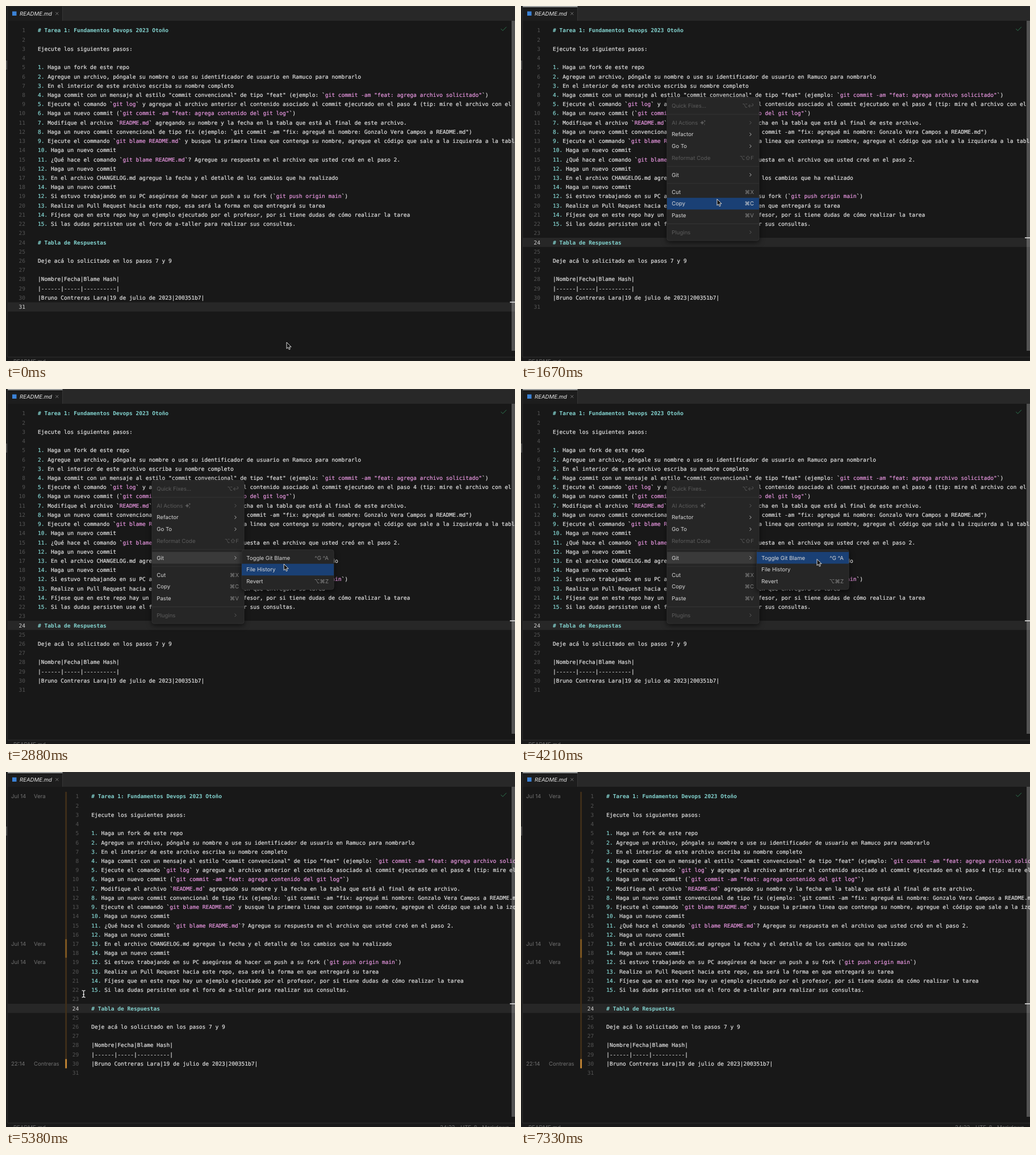
Animation of 896 by 625 pixels, one loop 7.43 s. Source, as an HTML page:

```html
<!DOCTYPE html>
<html lang="es">
<head>
<meta charset="utf-8">
<title>README.md</title>
<style>
  html, body { margin: 0; width: 100%; height: 100%; overflow: hidden; background: #181818; }
  svg { display: block; width: 896px; height: 625px; }
  text { white-space: pre; text-rendering: geometricPrecision; color: #d8d8d8; fill: currentColor; font: 9.6px Inter, "DejaVu Sans", sans-serif; }
  .mono { color: #dedede; font: 9.56px "DejaVu Sans Mono", monospace; stroke: currentColor; stroke-width: .22px; }
  .head { color: #82d2ce; font-weight: bold; stroke: none; }
  .num { color: #82d2ce; fill: currentColor; stroke: currentColor; }
  .code { color: #e394dc; fill: currentColor; stroke: currentColor; }
  .title { color: #e6e6e6; font-style: italic; }
  .line-no { color: #545454; text-anchor: end; stroke: none; }
  .line-no.on { color: #d6d6d6; }
  .note { color: #707070; }
  .off { color: #5c5c5c; }
  .key { color: #858585; text-anchor: end; }
  .key.off { color: #5c5c5c; }
  .key.lit { color: #d6d6d6; }
  .panel { fill: #262626; stroke: #303030; filter: drop-shadow(0 3px 5px #0009); }
  .stroke { fill: none; stroke-width: 1; }
</style>
</head>
<body>
<svg id="stage" viewBox="0 0 896 625"></svg>
<script>
const LOOP = 7430, ROW = 16.224, TOP = 34.9, SHIFT = 94.2;
const FOCUS_AT = 700, MENU_AT = 830, SUBMENU_AT = 2380, BLAME_AT = 4330;
const BLINK_FROM = 4920, BLINK = 602.5;

const source = `# Tarea 1: Fundamentos Devops 2023 Otoño

Ejecute los siguientes pasos:

1. Haga un fork de este repo
2. Agregue un archivo, póngale su nombre o use su identificador de usuario en Ramuco para nombrarlo
3. En el interior de este archivo escriba su nombre completo
4. Haga commit con un mensaje al estilo "commit convencional" de tipo "feat" (ejemplo: 'git commit -am "feat: agrega archivo solicitado"')
5. Ejecute el comando 'git log' y agregue al archivo anterior el contenido asociado al commit ejecutado en el paso 4 (tip: mire el archivo con el
6. Haga un nuevo commit ('git commit -am "feat: agrega contenido del git log"')
7. Modifique el archivo 'README.md' agregando su nombre y la fecha en la tabla que está al final de este archivo.
8. Haga un nuevo commit convencional de tipo fix (ejemplo: 'git commit -am "fix: agregué mi nombre: Gonzalo Vera Campos a README.md")
9. Ejecute el commando 'git blame README.md' y busque la primera linea que contenga su nombre, agregue el código que sale a la izquierda a la tabla
10. Haga un nuevo commit
11. ¿Qué hace el comando 'git blame README.md'? Agregue su respuesta en el archivo que usted creó en el paso 2.
12. Haga un nuevo commit
13. En el archivo CHANGELOG.md agregue la fecha y el detalle de los cambios que ha realizado
14. Haga un nuevo commit
12. Si estuvo trabajando en su PC asegúrese de hacer un push a su fork ('git push origin main')
13. Realize un Pull Request hacia este repo, esa será la forma en que entregará su tarea
14. Fíjese que en este repo hay un ejemplo ejecutado por el profesor, por si tiene dudas de cómo realizar la tarea
15. Si las dudas persisten use el foro de a-taller para realizar sus consultas.

# Tabla de Respuestas

Deje acá lo solicitado en los pasos 7 y 9

|Nombre|Fecha|Blame Hash|
|------|-----|----------|
|Bruno Contreras Lara|19 de julio de 2023|200351b7|
`.replace(/'/g, '`').split('\n');

const rect = (x, y, w, h, fill, extra = '') =>
  `<rect x="${x}" y="${y}" width="${w}" height="${h}" fill="${fill}" ${extra}/>`;
const label = (x, y, str, cls = '', extra = '') => `<text x="${x}" y="${y}" class="${cls}" ${extra}>${str}</text>`;
const stroke = (d, color, extra = '') => `<path class="stroke" d="${d}" stroke="${color}" ${extra}/>`;
const group = (id, content) => `<g id="${id}">${content}</g>`;
const rowTop = n => TOP + (n - 1) * ROW;
const baseline = n => rowTop(n) + 11.5;

const markup = line => line
  .replace(/`([^`]+)`/g, '`<tspan class="code">$1</tspan>`')
  .replace(/^\d+\./, '<tspan class="num">$&</tspan>');

const lines = source.map((line, i) =>
  label(34, baseline(i + 1), i + 1, 'mono line-no', `id="no${i + 1}"`) +
  label(56, baseline(i + 1), markup(line), line[0] === '#' ? 'mono head' : 'mono')).join('');

const note = (n, when, who) => label(9, baseline(n), when, 'note') + label(49, baseline(n), who, 'note');
const bar = (from, to, color) => rect(104.3, rowTop(from), 2.8, (to - from + 1) * ROW, color);
const blame = note(1, 'Jul 14', 'Vera') + note(17, 'Jul 14', 'Vera') + note(19, 'Jul 14', 'Vera') +
  note(30, '22:14', 'Contreras') +
  bar(1, 29, '#402f1a') + bar(17, 18, '#825922') + bar(30, 30, '#cb8a35');

// Menu entries: label, centre y, shortcut ('>' opens a submenu), enabled
const menuItems = [
  ['Quick Fixes...', 175.5, '⌥↩', false], ['AI Actions', 205.5, '>', false],
  ['Refactor', 226, '>', true], ['Go To', 246.8, '>', true], ['Reformat Code', 267.4, '⌥⇧F', false],
  ['Git', 297.2, '>', true], ['Cut', 327.2, '⌘X', true], ['Copy', 348, '⌘C', true],
  ['Paste', 368.5, '⌘V', true], ['Plugins', 398.3, '>', false]
];
const subItems = [
  ['Toggle Git Blame', 297.2, '^G ^A', true], ['File History', 318, '', true], ['Revert', 338.6, '⌥⌘Z', true]
];
const GIT_Y = 297.2;

function popup(id, x, y, h, items, dividers = []) {
  const entries = items.map(([name, cy, key, on]) => {
    const off = on ? '' : 'off';
    const tail = key === '>'
      ? stroke(`M${x + 145.5} ${cy - 2.8}l2.8 2.8l-2.8 2.8`, on ? '#b8b8b8' : '#5c5c5c')
      : label(x + 153, cy + 3.4, key, 'key ' + off, `data-y="${cy}"`);
    return label(x + 8.3, cy + 3.4, name, off) + tail;
  }).join('');
  return group(id,
    `<rect class="panel" x="${x}" y="${y}" width="162" height="${h}" rx="4"/>` +
    dividers.map(d => rect(x, d, 162, 1, '#343434')).join('') +
    rect(x, 0, 162, 20.6, '#1a4075', 'class="hover"') + entries);
}

const sparkle = '<path fill="#5c5c5c" d="M319 201.5q.7 3.3 4 4q-3.3.7-4 4q-.7-3.3-4-4q3.3-.7 4-4z"/>' +
  stroke('M323.2 201v3M321.7 202.5h3M323 207.5v2', '#5c5c5c', 'stroke-width=".8"');

const stage = document.getElementById('stage');
stage.innerHTML =
  rect(0, 0, 896, 625, '#181818') +
  rect(3, 0, 893, ROW, '#272727', 'id="band"') +
  group('doc', lines + rect(177.2, rowTop(24), 1, ROW, '#e0e0e0', 'id="caret"')) +
  group('blame', blame) +
  stroke('M871.3 40.2l3.2 3.2l6.4-6.6', '#2f8055', 'style="stroke-width:.9"') +
  rect(890, 26, 6, 581, '#fff', 'opacity=".25"') +
  rect(887, 0, 9, 1.6, '#e6e6e6', 'id="mark"') +
  rect(0, 0, 896, 26, '#282828') + rect(3, 0, 96.5, 26, '#1d1d1d') + rect(99, 0, 1, 26, '#363636') +
  rect(0, 0, 896, 0.8, '#343434') + rect(3, 0.5, 96.5, 1.5, '#c4c8c8', 'id="focus"') +
  rect(11, 9.5, 7.5, 7.5, '#3b82d6') +
  label(24, 16.6, 'README.md', 'title') +
  stroke('M87.3 10.8l5 5m0-5l-5 5', '#8a8a8a', 'style="stroke-width:.8"') +
  rect(0, 0, 2.4, 625, '#1c1c1c') + rect(2.2, 0, 1, 618, '#303030') + rect(0, 96, 2, 16, '#4a4a4a') +
  rect(3, 618, 893, 7, '#1a1a1a') + rect(3, 617.6, 893, 1, '#303030') +
  label(13, 629.2, 'README.md', 'note') +
  group('status', label(764, 629.2, '24:22', 'note') + label(800, 629.2, 'UTF-8', 'note') +
    label(838, 629.2, 'Markdown', 'note')) +
  popup('menu', 257, 161, 252, menuItems, [190.2, 281.8, 311.8, 383]) +
  popup('submenu', 415, 283, 70, subItems) +
  group('arrow', '<path d="M0 0V11.2L2.6 8.9L4.3 12.8L6.2 12L4.5 8.2H8.1Z" fill="#111" stroke="#f2f2f2" stroke-width=".9" stroke-linejoin="round"/>') +
  group('beam', stroke('M-3-6Q-.3-6 0-4.5Q.3-6 3-6M0-5V5M-3 6Q-.3 6 0 4.5Q.3 6 3 6M-1.5 1h3', '#e8e8e8', 'style="stroke-width:1.3"'));

const el = id => document.getElementById(id);
el('menu').insertAdjacentHTML('beforeend', sparkle);
const show = (id, on) => { el(id).style.display = on ? '' : 'none'; };
const move = (id, x, y) => el(id).setAttribute('transform', `translate(${x} ${y})`);

// Pointer path: time, x, y
const path = [
  [0, 494, 592], [40, 494, 592], [300, 395, 515], [620, 258, 420], [750, 254, 413], [1000, 254, 413],
  [1210, 300, 372], [1540, 300, 372], [1670, 345, 340], [1790, 352, 328], [2000, 352, 328],
  [2240, 382, 304], [2420, 396, 298], [2750, 396, 298], [2880, 489, 308], [3080, 502, 314],
  [3330, 496, 299], [3580, 496, 299], [3880, 521, 299.5], [4920, 521, 299.5], [5170, 154, 414],
  [5330, 154, 414], [5600, 62, 290], [5800, 40, 330], [6040, 14, 487], [6080, 13, 500],
  [6300, 16, 509], [6790, 45, 415], [7250, 6, 310], [7290, -20, 300], [LOOP, -20, 300]
];

function pointer(t) {
  const i = path.findIndex(p => p[0] > t);
  const [t0, x0, y0] = path[i - 1], [t1, x1, y1] = path[i];
  const k = (t - t0) / (t1 - t0);
  return [x0 + (x1 - x0) * k, y0 + (y1 - y0) * k];
}

const itemAt = (items, y) => items.find(([, cy, , on]) => on && Math.abs(y - cy) <= 10.3)?.[1];

function hover(id, y, color = '#1a4075') {
  const box = el(id).querySelector('.hover');
  box.style.display = y ? '' : 'none';
  if (y) box.setAttribute('y', y - 10.3);
  box.setAttribute('fill', color);
  for (const key of el(id).querySelectorAll('.key')) key.classList.toggle('lit', +key.dataset.y === y);
}

function draw(t) {
  const focused = t >= FOCUS_AT, blamed = t >= BLAME_AT;
  const row = focused ? 24 : 31;
  const [x, y] = pointer(t);

  el('band').setAttribute('y', rowTop(row));
  el('mark').setAttribute('y', focused ? 407.3 : 520.6);
  for (const n of [24, 31]) el('no' + n).classList.toggle('on', n === row);
  show('focus', focused);

  move('doc', blamed ? SHIFT : 0, 0);
  show('blame', blamed);
  show('status', blamed);
  show('caret', blamed && (t < BLINK_FROM || Math.floor((t - BLINK_FROM) / BLINK) % 2 === 1));

  const nested = t >= SUBMENU_AT && !blamed, inside = nested && x >= 415;
  show('menu', t >= MENU_AT && !blamed);
  show('submenu', nested);
  if (inside) hover('menu', GIT_Y, '#3a3a3a');
  else hover('menu', x >= 257 && x < 419 ? itemAt(menuItems, y) : 0);
  hover('submenu', inside ? itemAt(subItems, y) : 0);

  const beam = blamed && x > 135;
  show('beam', beam);
  show('arrow', !beam);
  move(beam ? 'beam' : 'arrow', x, y);
}

const start = performance.now();
function tick() {
  draw((performance.now() - start) % LOOP);
  requestAnimationFrame(tick);
}
tick();
</script>
</body>
</html>
```
